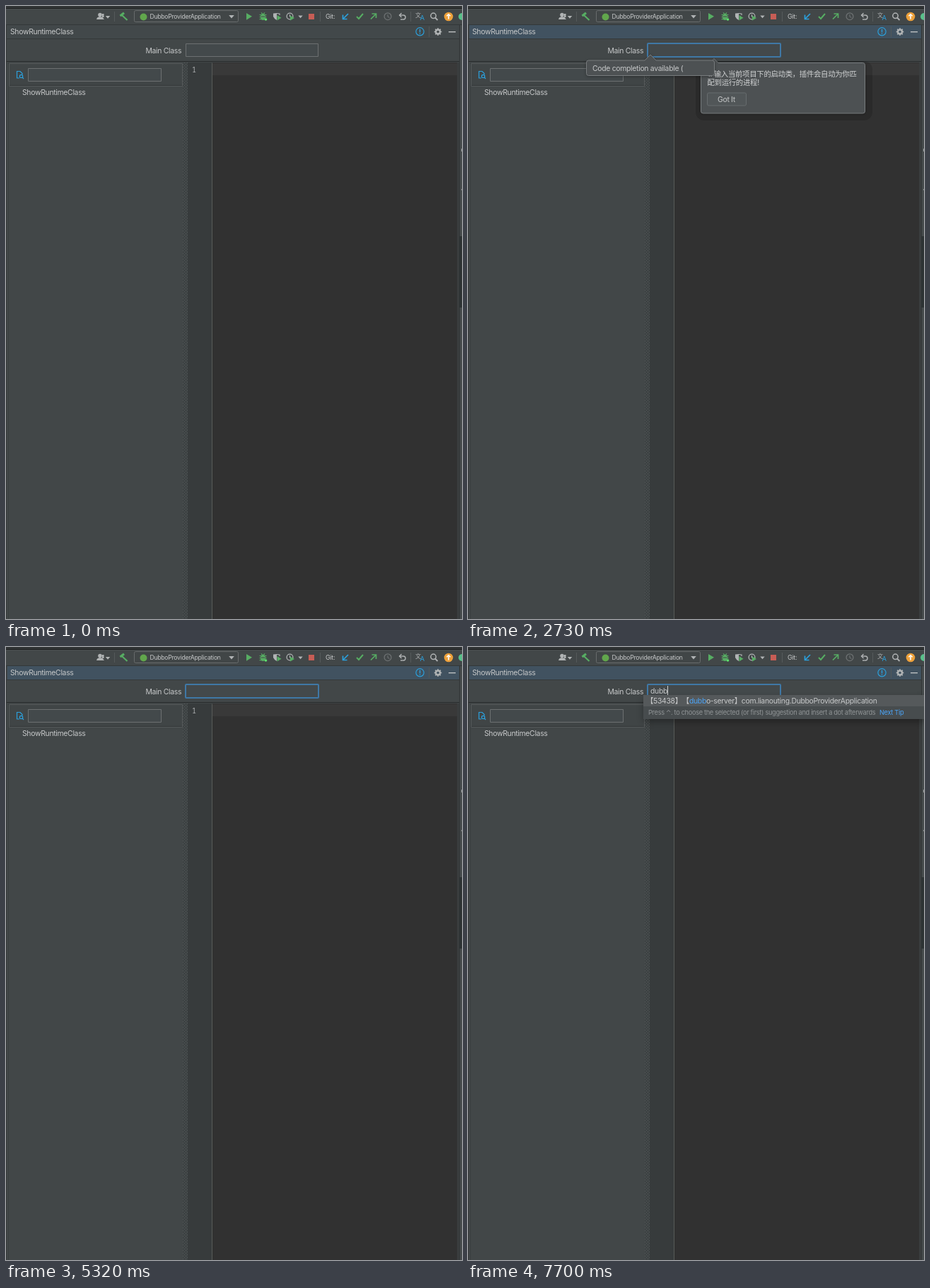
These frames come from a looping animation (645x868 px, 8 s). An HTML page with a canvas:

```html
<!DOCTYPE html>
<html lang="en">
<head>
<meta charset="utf-8">
<title>ShowRuntimeClass</title>
<style>
html, body { margin: 0; width: 645px; height: 868px; overflow: hidden; background: #424748; }
canvas { display: block; }
</style>
</head>
<body>
<canvas id="stage" width="645" height="868"></canvas>
<script>
const ctx = document.getElementById('stage').getContext('2d');
const LOOP = 8000;
const UI = 'Inter, "Noto Sans CJK SC", "Noto Sans CJK", "Noto Sans CJK JP", sans-serif';
const MONO = '"Noto Sans Mono", "DejaVu Sans Mono", monospace';
const C = {
  panel: '#424748', editor: '#313131', gutter: '#373b3c', row: '#393939', text: '#c6c8c9',
  edge: '#6c7071', grey: '#b0b3b4', green: '#57ad63', blue: '#2ba0dc',
  focus: '#3f78a6', balloon: '#4d5153', rim: '#787c7e'
};

function rect(x, y, w, h, color) {
  ctx.fillStyle = color;
  ctx.fillRect(x, y, w, h);
}

function frame(x, y, w, h, color, fill, r = 0, lw = 1) {
  ctx.beginPath();
  ctx.roundRect(x, y, w, h, r);
  if (fill) { ctx.fillStyle = fill; ctx.fill(); }
  if (color) { ctx.strokeStyle = color; ctx.lineWidth = lw; ctx.stroke(); }
}

function line(points, color, lw = 1.5) {
  ctx.beginPath();
  points.forEach(([x, y]) => ctx.lineTo(x, y));
  ctx.strokeStyle = color;
  ctx.lineWidth = lw;
  ctx.stroke();
}

function poly(points, color) {
  ctx.beginPath();
  points.forEach(([x, y]) => ctx.lineTo(x, y));
  ctx.closePath();
  ctx.fillStyle = color;
  ctx.fill();
}

function disc(x, y, r, color) {
  ctx.beginPath();
  ctx.arc(x, y, r, 0, Math.PI * 2);
  ctx.fillStyle = color;
  ctx.fill();
}

function ring(x, y, r, color, lw = 1.2, from = 0, to = Math.PI * 2) {
  ctx.beginPath();
  ctx.arc(x, y, r, from, to);
  ctx.strokeStyle = color;
  ctx.lineWidth = lw;
  ctx.stroke();
}

// Draws text on its middle line and returns the x where it ends.
function label(str, x, y, color = C.text, size = 10.4, family = UI) {
  ctx.font = `${size}px ${family}`;
  ctx.letterSpacing = '-0.3px';
  ctx.textBaseline = 'alphabetic';
  ctx.fillStyle = color;
  ctx.fillText(str, x, y + size * 0.36);
  return x + ctx.measureText(str).width;
}

function dropArrow(x, y, r = 3.2) {
  poly([[x - r, y - r / 2], [x + r, y - r / 2], [x, y + r / 2 + .6]], C.grey);
}

const weave = (() => {
  const tile = document.createElement('canvas');
  tile.width = tile.height = 4;
  const g = tile.getContext('2d');
  g.fillStyle = '#3e4344';
  g.fillRect(0, 0, 4, 4);
  g.fillStyle = '#55595a';
  g.fillRect(0, 0, 1, 1);
  g.fillRect(2, 2, 1, 1);
  return ctx.createPattern(tile, 'repeat');
})();

function toolbarIcons() {
  for (const x of [153, 444, 572]) rect(x, 8, 1, 14, '#555a5b');

  disc(133, 12.5, 2.8, C.grey);
  poly([[128, 19], [129, 16.5], [132, 15], [136, 15.5], [139, 19]], C.grey);
  rect(136, 11, 2.5, 5, C.grey);
  dropArrow(144, 15.5);

  line([[164, 13], [171.5, 20]], C.green, 2.2);
  line([[161.5, 14], [167, 9.8]], C.green, 3.2);

  frame(181.5, 6.5, 147, 16, '#686c6d', '#414647', 2);
  disc(194.5, 15.5, 5, '#61a64c');
  label('DubboProviderApplication', 203.5, 14.8, C.text, 8.7);
  dropArrow(319, 15, 3.8);

  poly([[340, 10], [348, 14.8], [340, 19.7]], C.green);

  ctx.beginPath();
  ctx.ellipse(363.5, 15.5, 3.3, 4.6, 0, 0, Math.PI * 2);
  ctx.fillStyle = C.green;
  ctx.fill();
  for (const y of [12.5, 15.5, 18.5]) rect(358.5, y - .5, 10, 1.1, C.green);
  line([[361, 9.5], [363.5, 12], [366, 9.5]], C.green, 1.1);
  line([[361, 15], [366, 15]], C.panel, 1);
  disc(367.5, 19, 1.8, '#5fe06e');

  poly([[378, 10.5], [383, 10], [383, 20], [380, 18], [378, 15]], C.grey);
  line([[383, 10.5], [387, 11], [387, 13]], C.grey, 1.2);
  poly([[383.5, 13], [389.5, 16.8], [383.5, 20.5]], C.green);

  ring(401.5, 14.5, 4.4, C.grey, 1.3);
  line([[401.5, 12], [401.5, 15], [403, 15]], C.grey, 1.1);
  poly([[402, 13.5], [408, 17], [402, 20.5]], C.green);
  dropArrow(416.5, 15);

  rect(428, 11, 8, 8, '#c75d55');

  label('Git:', 452, 14.8, C.text, 9);
  line([[484, 11], [477, 18]], C.blue, 1.7);
  line([[476.5, 12.5], [476.5, 18.5], [482.5, 18.5]], C.blue, 1.7);
  line([[496, 15], [499, 18], [505, 11]], C.green, 2);
  line([[516, 18.5], [523, 11.5]], C.green, 1.7);
  line([[517.5, 11], [523.5, 11], [523.5, 17]], C.green, 1.7);
  ring(540, 14.7, 4.9, '#6d7172', 1.3);
  line([[540, 12], [540, 15], [542.5, 16.5]], '#6d7172', 1.1);

  line([[559.5, 10], [556.5, 13], [559.5, 16]], C.grey, 1.4);
  line([[556.5, 13], [562, 13]], C.grey, 1.4);
  ring(562, 16, 3, C.grey, 1.4, -Math.PI / 2, Math.PI / 2);
  line([[562, 19], [558, 19]], C.grey, 1.4);

  label('文', 579, 13, C.grey, 8);
  label('A', 585.5, 16.5, C.blue, 9.5);

  ring(604.5, 13.8, 3.7, C.grey, 1.5);
  line([[607, 16.5], [610.5, 20]], C.grey, 1.8);

  disc(626, 15, 6.3, '#eda13b');
  line([[626, 18.5], [626, 12]], '#fff', 1.6);
  line([[623.3, 14.3], [626, 11.7], [628.7, 14.3]], '#fff', 1.5);
  disc(645, 15, 5, '#58c08a');
}

function header(focused, hover) {
  rect(2, 27, 640, 20, focused ? '#415260' : '#42484a');
  label('ShowRuntimeClass', 6, 36.6);
  if (hover) frame(577, 28, 17, 17, null, '#34505d', 2);
  ring(585.5, 36.3, 5.6, C.blue, 1.2);
  rect(584.8, 32.8, 1.4, 4.6, C.blue);
  rect(584.8, 38.5, 1.4, 1.4, C.blue);
  rect(598, 29, 1, 15, '#525759');
  ring(611, 36.5, 3, C.grey, 2.4);
  for (let i = 0; i < 8; i++) {
    const c = Math.cos(i * Math.PI / 4), s = Math.sin(i * Math.PI / 4);
    line([[611 + 3.5 * c, 36.5 + 3.5 * s], [611 + 5.3 * c, 36.5 + 5.3 * s]], C.grey, 1.8);
  }
  rect(626, 36, 10, 1.3, '#c3c6c7');
}

function windowBase(focused, hover) {
  rect(0, 0, 645, 868, C.panel);
  rect(0, 0, 645, 3, '#303334');
  rect(0, 3, 645, 1, '#1f2122');
  rect(0, 4, 645, 1, '#4c5152');
  toolbarIcons();
  rect(0, 26, 645, 1, '#333738');
  header(focused, hover);
  rect(0, 46, 642, 1, '#343839');
  rect(0, 78, 642, 1, '#272a2b');
  rect(0, 27, 1, 841, '#343839');
  rect(3, 80, 1, 788, '#3a3f40');

  label('Main Class', 197.5, 62.8);
  if (focused) frame(254, 53, 188, 19, C.focus, '#43494b', 1, 2);
  else frame(254.5, 53.5, 187, 18, C.edge, '#43494b');

  frame(4.5, 81.5, 245, 32, '#55595a', '#404546');
  rect(5, 112, 244, 1, '#323637');
  frame(31.5, 88.5, 188, 18, C.edge, '#43494b');
  line([[19, 102], [15.5, 102], [15.5, 92.5], [20, 92.5], [23, 95.5], [23, 97]], C.blue, 1.2);
  ring(21.5, 99.5, 2.2, C.blue, 1.2);
  line([[23, 101], [25, 103]], C.blue, 1.3);
  label('ShowRuntimeClass', 23, 122.5);

  rect(250, 80, 7, 788, weave);
  rect(257, 80, 34, 788, C.gutter);
  rect(292, 80, 347, 788, C.editor);
  rect(292, 81, 347, 17, C.row);
  rect(291, 81, 1, 787, '#585b59');
  label('1', 263, 90, '#b0b3b4', 10, MONO);

  rect(638, 80, 3, 788, '#3a3d3e');
  rect(641, 27, 1, 841, '#323637');
  rect(642, 27, 3, 841, '#454a4b');
  rect(641, 326, 4, 101, '#2d3233');
  rect(644, 202, 1, 4, '#a0a3a4');
  rect(644, 259, 1, 2, '#8a8d8e');
}

// Rounded box with a small tip pointing up.
function balloon(x, y, w, h, tipX, tipH, blur) {
  ctx.save();
  ctx.beginPath();
  ctx.moveTo(x + 3, y);
  ctx.lineTo(tipX - tipH, y);
  ctx.lineTo(tipX, y - tipH);
  ctx.lineTo(tipX + tipH, y);
  ctx.arcTo(x + w, y, x + w, y + h, 3);
  ctx.arcTo(x + w, y + h, x, y + h, 3);
  ctx.arcTo(x, y + h, x, y, 3);
  ctx.arcTo(x, y, x + w, y, 3);
  ctx.closePath();
  ctx.shadowColor = 'rgba(0,0,0,.4)';
  ctx.shadowBlur = blur;
  ctx.shadowOffsetY = blur / 4;
  ctx.fillStyle = C.balloon;
  ctx.fill();
  ctx.shadowColor = 'transparent';
  ctx.strokeStyle = C.rim;
  ctx.lineWidth = 1;
  ctx.stroke();
  ctx.restore();
}

function gotIt(x, y) {
  frame(x + .5, y + .5, 55, 18, '#676c6e', '#515658', 2);
  label('Got It', x + 15, y + 9.5);
}

function mainClassTip() {
  frame(322, 78, 250, 84, null, 'rgba(0,0,0,.15)', 12);
  balloon(329.5, 80.5, 232, 71.5, 348, 6, 3);
  label('1. 输入当前项目下的启动类，插件会自动为你匹', 338.5, 96.2, '#d0d2d3');
  label('配到运行的进程!', 338.5, 108.4, '#d0d2d3');
  gotIt(338, 122.5);
}

function completionTip() {
  balloon(167.5, 77, 181, 21.5, 258, 8, 4);
  label('Code completion available (', 176, 87.8);
}

function searchTip() {
  balloon(107.5, 115.5, 154.5, 58.5, 126, 6, 14);
  ctx.save();
  ctx.beginPath();
  ctx.rect(108, 116, 141.5, 50);
  ctx.clip();
  label('2. 查找该进程中运行时的class', 116.5, 131, '#d0d2d3');
  ctx.restore();
  gotIt(116, 145);
}

function suggestions(typed, withHint) {
  const w = withHint ? 400 : 343, h = withHint ? 34 : 16;
  ctx.save();
  ctx.shadowColor = 'rgba(0,0,0,.3)';
  ctx.shadowBlur = 9;
  ctx.shadowOffsetY = 4;
  rect(248, 68, w, h, '#474c4e');
  ctx.restore();
  rect(248, 68, w, 16, '#55595b');
  // Adjacent brackets are drawn apart so that each keeps its full width.
  let x = label('【53438】', 252, 76);
  x = label('【', x, 76);
  x = label(typed, x, 76, '#4ba3f5');
  label('dubbo-server】com.lianouting.DubboProviderApplication'.slice(typed.length), x, 76);
  if (withHint) {
    label('Press ⌃. to choose the selected (or first) suggestion and insert a dot afterwards', 255, 92.8, '#8f9395', 9.2);
    label('Next Tip', 582, 92.8, '#4ba3f5', 9.2);
  }
}

function arrowCursor(x, y) {
  const shape = [[0, 0], [0, 11], [2.6, 8.8], [4.4, 12.6], [6.4, 11.7], [4.7, 8], [8, 7.8]]
    .map(([dx, dy]) => [x + dx, y + dy]);
  line([...shape, shape[0]], '#fff', 2);
  poly(shape, '#111');
}

function beamCursor(x, y) {
  for (const [color, lw] of [['rgba(235,235,235,.75)', 2.4], ['#1c1c1c', 1]]) {
    ctx.beginPath();
    for (const side of [-1, 1]) {
      ctx.moveTo(x + 2.5 * side, y - 5.5);
      ctx.quadraticCurveTo(x, y - 5.5, x, y - 4);
      ctx.moveTo(x + 2.5 * side, y + 5.5);
      ctx.quadraticCurveTo(x, y + 5.5, x, y + 4);
    }
    ctx.moveTo(x, y - 4);
    ctx.lineTo(x, y + 4);
    ctx.strokeStyle = color;
    ctx.lineWidth = lw;
    ctx.stroke();
  }
}

function draw(t) {
  const during = (a, b) => t >= a && t < b;
  const keys = [6860, 7420, 7630, 7700];
  const typed = 'dubb'.slice(0, keys.filter(k => t >= k).length);
  const caretOn = during(3710, 4200) || during(4760, 5320) || t >= 6370;

  windowBase(t >= 1820, during(1260, 1820));
  const end = label(typed, 258, 62);
  if (caretOn) rect(Math.round(end), 55, 1, 13, '#d0d2d3');

  if (during(1820, 3010)) mainClassTip();
  if (during(2730, 3010)) completionTip();
  if (during(3080, 4830)) searchTip();
  if (t >= 7070) suggestions(typed, t >= 7700);
  if (during(4760, 4830)) arrowCursor(145, 158);
  if (during(5950, 7000)) beamCursor(302.5, 65);
}

const start = performance.now();
function tick() {
  draw((performance.now() - start) % LOOP);
  requestAnimationFrame(tick);
}
tick();
</script>
</body>
</html>
```
